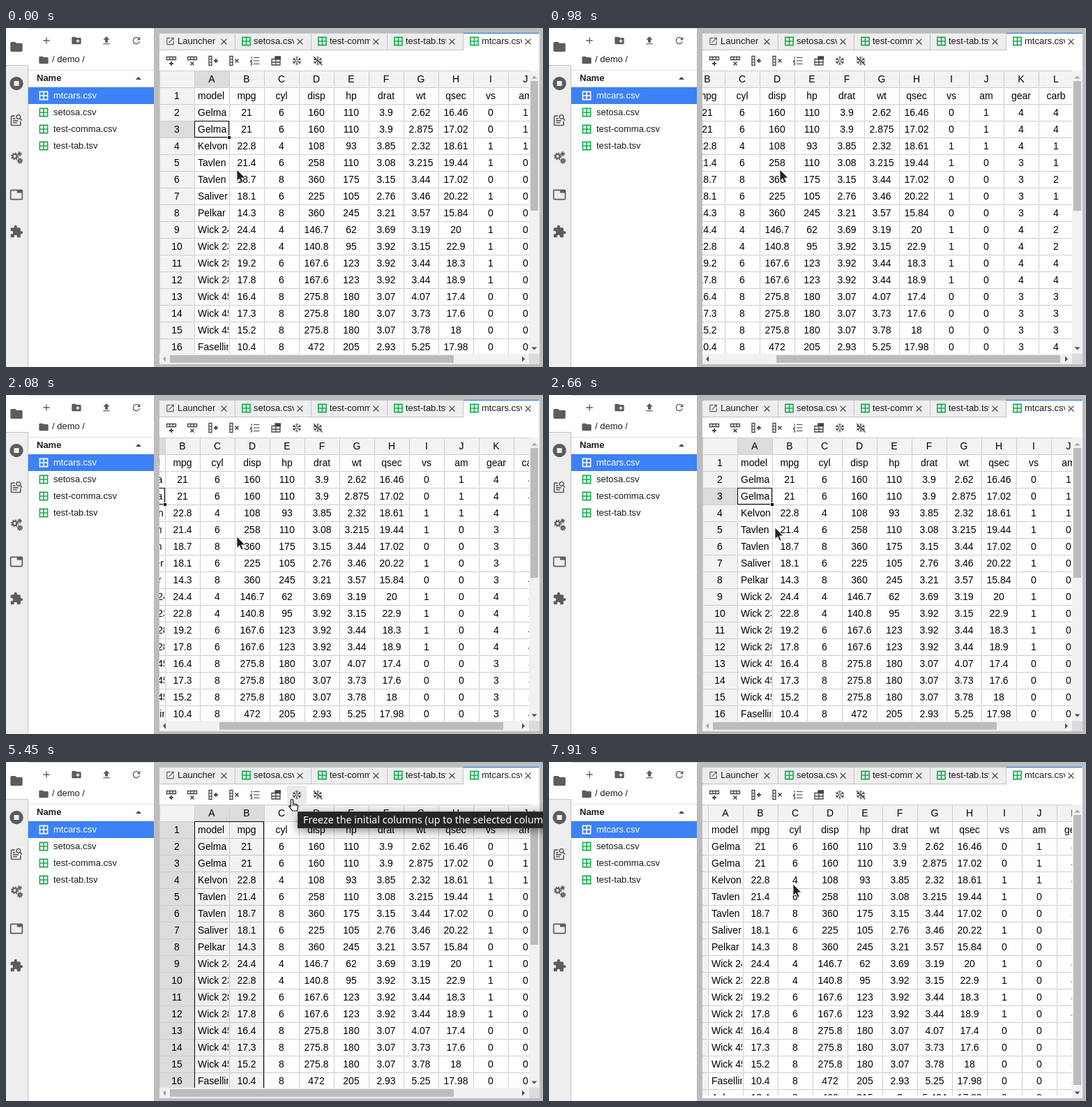
Write an HTML page that moves like this. It is 770x486 px and loops after 7990 ms.

```html
<!DOCTYPE html>
<html lang="en">
<head>
<meta charset="utf-8">
<title>Spreadsheet viewer</title>
<style>
html, body { margin: 0; width: 100%; height: 100%; overflow: hidden; }
#stage { position: absolute; left: 0; top: 0; width: 770px; height: 486px; overflow: hidden;
  background: #bdbdbd; font: 13px/24px "Liberation Sans", Arial, sans-serif; color: #1c1c1c; }
#stage div, #stage svg { position: absolute; box-sizing: border-box; white-space: nowrap; }
#icons { left: 0; top: 0; }
#rail { left: 0; top: 0; width: 32px; height: 486px; background: #eee; border-right: 1px solid #c4c4c4; }
#rail div { left: 0; top: 0; width: 32px; height: 54px; background: #fff; border-bottom: 1px solid #c4c4c4; }
#files { left: 32px; top: 0; width: 180px; height: 486px; background: #fff; border-top: 1px solid #d8d8d8; }
#crumb { left: 34px; top: 32px; }
#head { left: 0; top: 59px; width: 180px; height: 25px; padding-left: 12px; font-weight: bold;
  line-height: 22px; border: solid #e0e0e0; border-width: 1px 0; }
.file { left: 0; width: 180px; height: 24px; padding-left: 36px; }
.file.on { background: #3c81f6; color: #fff; }
.tab { top: 7px; width: 109px; height: 25px; background: #eee; border: 1px solid #c2c2c2; border-left: 0; }
.tab.on { background: #fff; border-color: #fff; border-top-color: #1976d2; }
.tab div { left: 26px; top: -1px; width: 58px; overflow: hidden; }
#panel { left: 220px; top: 32px; width: 545px; height: 450px; background: #fff; }
#hover { left: 403px; top: 34px; width: 28px; height: 26px; background: #e9e9e9; }
#view { left: 220px; top: 61px; width: 530px; overflow: hidden; }
#grid { left: 0; top: 0; width: 651px; height: 432px; }
.cell { width: 50px; height: 24px; border: 1px solid transparent; border-top-color: #ccc; border-left-color: #ccc;
  background: #fff; font-size: 14px; line-height: 22px; color: #000; text-align: center; overflow: hidden; }
.cell.name { text-align: left; padding-left: 4px; }
#sel { border: 1px solid #000; }
#knob { left: 97px; top: 93px; width: 5px; height: 5px; background: #000; border: solid #fff; border-width: 1px 0 0 1px; }
.track { background: #f1f1f1; }
.thumb { background: #bcbcbc; }
#corner { left: 750px; top: 467px; width: 15px; height: 15px; background: #dcdcdc; }
#tip { left: 418px; top: 71px; width: 400px; height: 24px; padding-left: 7px; background: #262626;
  border: 1px solid #3c3c3c; box-shadow: 0 4px 14px rgba(0,0,0,.45); color: #fff;
  font: 14.3px/21px "Noto Sans", "Open Sans", sans-serif; }
#arrow, #hand { left: 0; top: 0; overflow: visible; }
</style>
</head>
<body>
<div id="stage">
  <div id="rail"><div></div></div>
  <div id="files"><div id="crumb">/ demo /</div><div id="head">Name</div></div>
  <div id="panel"></div>
  <div id="hover"></div>
  <div id="view"><div id="grid"></div></div>
  <div class="track" id="htrack"></div><div class="thumb" id="hthumb"></div><div id="corner"></div>
  <div class="track" id="vtrack"></div><div class="thumb" id="vthumb"></div>
  <svg id="icons" width="770" height="486"></svg>
  <div id="tip">Freeze the initial columns (up to the selected column)</div>
  <svg id="arrow" width="14" height="20"><path d="M0 0V16.5L3.8 13 6.5 19 9.2 17.9 6.6 12H12Z" fill="#222" stroke="#fff" stroke-width=".8"/></svg>
  <svg id="hand" width="16" height="20"><path d="M5 .5c1.2 0 1.7.8 1.7 1.6V6.8l5.6 1.2c1 .3 1.5 1 1.4 2l-.6 4.3c-.2 1-.6 1.6-.6 2.7H5.8L.9 11c-.5-.9.7-2 1.7-1.3l.9 1V2.1C3.5 1.2 4 .5 5 .5z" fill="#fff" stroke="#111" stroke-width="1.2"/><path d="M6.7 7v3M9.2 7.7v2.6M11.5 8.2v2.3" stroke="#111"/></svg>
</div>
<script>
const $ = id => document.getElementById(id);
const put = (parent, cls, css, text = '') => {
  const el = document.createElement('div');
  el.className = cls;
  el.textContent = text;
  for (const k in css) el.style[k] = css[k] + 'px';
  parent.append(el);
  return el;
};

// Icons
const GREY = '#5c5c5c', DARK = '#444', GREEN = '#12ad4b';
const paths = {
  folder: 'M10 4H4c-1.1 0-2 .9-2 2v12c0 1.1.9 2 2 2h16c1.1 0 2-.9 2-2V8c0-1.1-.9-2-2-2h-8z',
  newDir: 'M20 6h-8l-2-2H4c-1.1 0-2 .9-2 2v12c0 1.1.9 2 2 2h16c1.1 0 2-.9 2-2V8c0-1.1-.9-2-2-2zm-1 8h-3v3h-2v-3h-3v-2h3V9h2v3h3z',
  upload: 'M9 16h6v-6h4l-7-7-7 7h4zm-4 2h14v2H5z',
  refresh: 'M17.65 6.35A8 8 0 1 0 19.73 14h-2.08A6 6 0 1 1 16.22 7.78L13 11h7V4z',
  add: 'M19 13h-6v6h-2v-6H5v-2h6V5h2v6h6z',
  stop: 'M12 1a11 11 0 1 0 .01 0zM8 8h8v8H8z',
  search: 'M18 13v7H4V6h5l.5-2H4a2 2 0 0 0-2 2v14a2 2 0 0 0 2 2h14a2 2 0 0 0 2-2v-5zM19.3 8.9A4.5 4.5 0 1 0 17.9 10.3L21 13.4 22.4 12zM15.5 9a2.5 2.5 0 1 1 .01 0zM6 8.5h4v2H6zM6 12h9v2H6zM6 15.500h7v2H6z',
  puzzle: 'M20.5 11H19V7c0-1.1-.9-2-2-2h-4V3.5a2.5 2.5 0 0 0-5 0V5H4c-1.1 0-2 .9-2 2v3.8h1.5a2.7 2.7 0 0 1 0 5.4H2V20c0 1.1.9 2 2 2h3.8v-1.5a2.7 2.7 0 0 1 5.4 0V22H17c1.1 0 2-.9 2-2v-4h1.5a2.5 2.5 0 0 0 0-5z',
  tabs: 'M21 3H3c-1.1 0-2 .9-2 2v14c0 1.1.9 2 2 2h18c1.1 0 2-.9 2-2V5c0-1.1-.9-2-2-2zm0 16H3V5h10v4h8z',
  launch: 'M19 19H5V5h7V3H5a2 2 0 0 0-2 2v14c0 1.1.9 2 2 2h14a2 2 0 0 0 2-2v-7h-2zM14 3v2h3.6l-9.8 9.8 1.4 1.4L19 6.4V10h2V3z',
  close: 'M19 6.4L17.6 5 12 10.6 6.4 5 5 6.4 10.6 12 5 17.6 6.4 19 12 13.4 17.6 19 19 17.6 13.4 12z',
  sheet: 'M2.4 2.4v19.2h19.2V2.4zm16.8 8.4h-6V4.8h6zM10.8 4.8v6h-6v-6zm-6 8.4h6v6h-6zm8.4 6v-6h6v6z'
};
const draw = body => $('icons').insertAdjacentHTML('beforeend', body);
const group = (x, y, body, color = DARK) =>
  draw(`<g transform="translate(${x} ${y})" fill="none" stroke="${color}" stroke-width="1.3">${body}</g>`);
const icon = (name, x, y, size = 16, color = GREY) =>
  draw(`<path transform="translate(${x - size / 2} ${y - size / 2}) scale(${size / 24})" fill="${color}" fill-rule="evenodd" d="${paths[name]}"/>`);
const gear = (x, y, r) =>
  `<circle cx="${x}" cy="${y}" r="${r}" stroke-width="2.2"/><circle cx="${x}" cy="${y}" r="${r + 1.6}" stroke-width="1.8" stroke-dasharray="${(r + 1.6) * Math.PI / 8}"/>`;

icon('folder', 15, 27, 20.8);
icon('stop', 15, 79.5, 21);
icon('search', 15, 132, 20);
group(15, 186, gear(-2.5, -2, 3) + gear(5, 4.5, 1.8) + gear(4.5, -5.5, 1), GREY);
icon('tabs', 15, 239, 20);
icon('puzzle', 15, 292, 20);
['add', 'newDir', 'upload', 'refresh'].forEach((name, i) => icon(name, 58 + 43 * i, 18));
icon('folder', 54, 46);
draw('<path d="M186 74l4-4 4 4z" fill="#444"/>');

['mtcars.csv', 'setosa.csv', 'test-comma.csv', 'test-tab.tsv'].forEach((name, i) => {
  put($('files'), i ? 'file' : 'file on', { top: 84 + 24 * i }, name);
  icon('sheet', 54, 97 + 24 * i, 16, i ? GREEN : '#fff');
});
['Launcher', 'setosa.csv', 'test-comma.csv', 'test-tab.tsv', 'mtcars.csv'].forEach((name, i) => {
  const left = 220 + 109 * i;
  const tab = put($('stage'), i === 4 ? 'tab on' : 'tab', { left });
  put(tab, '', {}, name);
  icon(i ? 'sheet' : 'launch', left + 15.5, 19, i ? 16 : 14, i ? GREEN : GREY);
  icon('close', left + 92.5, 19.5, 15, DARK);
});
$('stage').append($('icons'), $('tip'), $('arrow'), $('hand'));

// Toolbar
const plus = '<path d="M-3 4H3M0 1V7" stroke-width="1.8"/>';
const cross = '<path d="M-2.5 1.5l5 5m0-5l-5 5" stroke-width="1.5"/>';
const rowBar = '<path d="M-6.5-5.5H6.5V-1.5H-6.5zM-2.2-5.5v4M2.2-5.5v4"/>';
const colBar = '<path d="M-6-6.5H-2V6.5H-6zM-6-2.2h4M-6 2.2h4"/>';
const beside = body => `<g transform="translate(4 -4)">${body}</g>`;
const flake = [0, 60, 120, 180, 240, 300].map(a =>
  `<path transform="rotate(${a})" d="M0-1V-6.5M-2-5.5L0-3.5 2-5.5" stroke-width="1"/>`).join('');
[ rowBar + plus, rowBar + cross, colBar + beside(plus), colBar + beside(cross),
  '<path d="M-2-4.500H6.5M-2 0H6.5M-2 4.500H6.5M-5-6v3M-6.5-1h2l-2 2.500h2M-6.5 3h2v3h-2" stroke-width="1.1"/>',
  '<path d="M-6-2.5H6V6H-6zM-6 2H6M0-2.5V6"/><path d="M-1-6H6.5v3.5H-1z" fill="#444"/>',
  flake, flake + '<path d="M-6-6L6.5 6.5"/>'
].forEach((body, i) => group(237 + 30 * i, 47, body));

// Table: each line is "model: mpg wt qsec | disp hp drat carb"; a missing engine repeats the one above
const cars = `Gelma KX4: 21 2.62 16.46 | 160 110 3.9 4
Gelma KX4 Van: 21 2.875 17.02
Kelvon 710: 22.8 2.32 18.61 | 108 93 3.85 1
Tavlen Drive: 21.4 3.215 19.44 | 258 110 3.08 1
Tavlen Sportabout: 18.7 3.44 17.02 | 360 175 3.15 2
Saliver: 18.1 3.46 20.22 | 225 105 2.76 1
Pelkar 360: 14.3 3.57 15.84 | 360 245 3.21 4
Wick 240D: 24.4 3.19 20 | 146.7 62 3.69 2
Wick 230: 22.8 3.15 22.9 | 140.8 95 3.92 2
Wick 280: 19.2 3.44 18.3 | 167.6 123 3.92 4
Wick 280C: 17.8 3.44 18.9
Wick 450SE: 16.4 4.07 17.4 | 275.8 180 3.07 3
Wick 450SL: 17.3 3.73 17.6
Wick 450SLC: 15.2 3.78 18
Fasellin Westwood: 10.4 5.25 17.98 | 472 205 2.93 4
Ashgrove Regent: 10.4 5.424 17.82 | 460 215 3 4`;
let engine;
const rows = cars.split('\n').map((line, i) => {
  const [name, own, shared] = line.split(/: | \| /);
  const [mpg, wt, qsec] = own.split(' ');
  engine = shared ? shared.split(' ') : engine;
  const [disp, hp, drat, carb] = engine;
  const cyl = disp < 150 ? 4 : disp < 260 ? 6 : 8;
  const straight = cyl < 8 && disp !== '160';
  return [name, mpg, cyl, disp, hp, drat, wt, qsec, +straight, +(i < 3), disp < 200 ? 4 : 3, carb];
});
rows.unshift('model mpg cyl disp hp drat wt qsec vs am gear carb'.split(' '));

const grid = $('grid');
const cell = (c, r, text, cls = 'cell') => put(grid, cls, { left: 50 * c, top: 24 * r }, text);
const shade = (el, on) => el.style.background = on ? '#dcdcdc' : '#f3f3f3';
shade(cell(0, 0, ''), false);
const colHeads = [...'ABCDEFGHIJKL'].map((name, i) => cell(i + 1, 0, name));
const rowHeads = rows.map((row, r) => {
  row.forEach((v, c) => cell(c + 1, r + 1, v, c ? 'cell' : 'cell name'));
  return cell(0, r + 1, r + 1);
});
const sel = put(grid, '', { left: 50 });
sel.id = 'sel';
put(grid, '', {}).id = 'knob';

// Scrollbar arrows
const tri = (id, d) => draw(`<path id="${id}" d="${d}"/>`);
tri('up', 'M753.5 72.5l4-4 4 4z');
tri('down', 'M753.5 457.5l4 4 4-4z');
tri('left', 'M229 470.5l-4 4 4 4z');
tri('right', 'M740 470.5l4 4-4 4z');
const enable = (id, on) => $(id).style.fill = on ? '#505050' : '#a3a3a3';
enable('up', false);
enable('down', true);

// Motion runs in 80 ms steps: progress of n steps starting at t0
const LOOP = 7990, STEP = 80, MAX_SCROLL = 121;
const progress = (t, t0, n) => Math.min(n, Math.max(0, Math.floor((t - t0) / STEP) + 1)) / n;
const ease = p => p ** 2.82 / (p ** 2.82 + (1 - p) ** 2.82);
const scrollAt = t => Math.round(
  MAX_SCROLL * (ease(progress(t, 500, 9)) - ease(progress(t, 2000, 5))) + 42 * ease(progress(t, 7830, 2)));

// Pointer moves: start, steps, end point
const moves = [[2660, 1, 324, 190], [2830, 4, 288, 75], [3500, 1, 310, 75], [3670, 2, 341, 72], [3920, 2, 337, 69],
  [4780, 1, 357, 69], [4950, 3, 408, 56], [5450, 1, 410, 53], [6650, 5, 350, 175]];
const pointerAt = t => moves.reduce(([x, y], [t0, n, toX, toY]) => {
  const p = progress(t, t0, n);
  return [x + (toX - x) * p, y + (toY - y) * p];
}, [331, 203]);

const pickAt = t => t < 3070 ? 'cell' : t < 3920 ? 'A' : t < 6140 ? 'AB' : '';
const between = (t, a, b) => t >= a && t < b;
const show = (el, on) => el.style.display = on ? '' : 'none';
const box = (el, x, y, w, h) =>
  Object.assign(el.style, { left: x + 'px', top: y + 'px', width: w + 'px', height: h + 'px' });

function select(pick) {
  const single = pick === 'cell', cols = single ? 1 : pick.length;
  show(sel, pick);
  show($('knob'), single);
  box(sel, 50, single ? 72 : 24, 50 * cols, single ? 24 : 420);
  sel.style.background = single ? 'none' : 'rgba(0,0,0,.05)';
  colHeads.forEach((el, i) => shade(el, i < cols));
  rowHeads.forEach((el, i) => shade(el, pick && (!single || i === 2)));
}

function render(t) {
  const scroll = scrollAt(t), [x, y] = pointerAt(t).map(Math.round), frozen = t >= 6220;
  grid.style.transform = `translateX(${-scroll}px)`;
  $('view').style.height = (frozen ? 417 : 406) + 'px';
  select(pickAt(t));

  box($('vtrack'), 750, 61, 15, frozen ? 421 : 406);
  box($('vthumb'), 752, 76, 11, frozen ? 387 : 186);
  $('down').setAttribute('transform', `translate(0 ${frozen ? 15 : 0})`);
  box($('htrack'), 220, 467, 530, 15);
  box($('hthumb'), 235 + scroll * 500 / 651, 469, 407, 11);
  ['htrack', 'hthumb', 'corner', 'left', 'right'].forEach(id => show($(id), !frozen));
  enable('left', scroll > 0);
  enable('right', scroll < MAX_SCROLL);

  const pointing = between(t, 5110, 6650);
  show($('hover'), pointing);
  show($('tip'), between(t, 5450, 6140));
  show($('hand'), pointing);
  show($('arrow'), !pointing);
  $('arrow').style.transform = `translate(${x}px, ${y}px)`;
  $('hand').style.transform = `translate(${x - 5}px, ${y}px)`;
}

const start = performance.now();
function tick() {
  render((performance.now() - start) % LOOP);
  requestAnimationFrame(tick);
}
tick();
</script>
</body>
</html>
```
